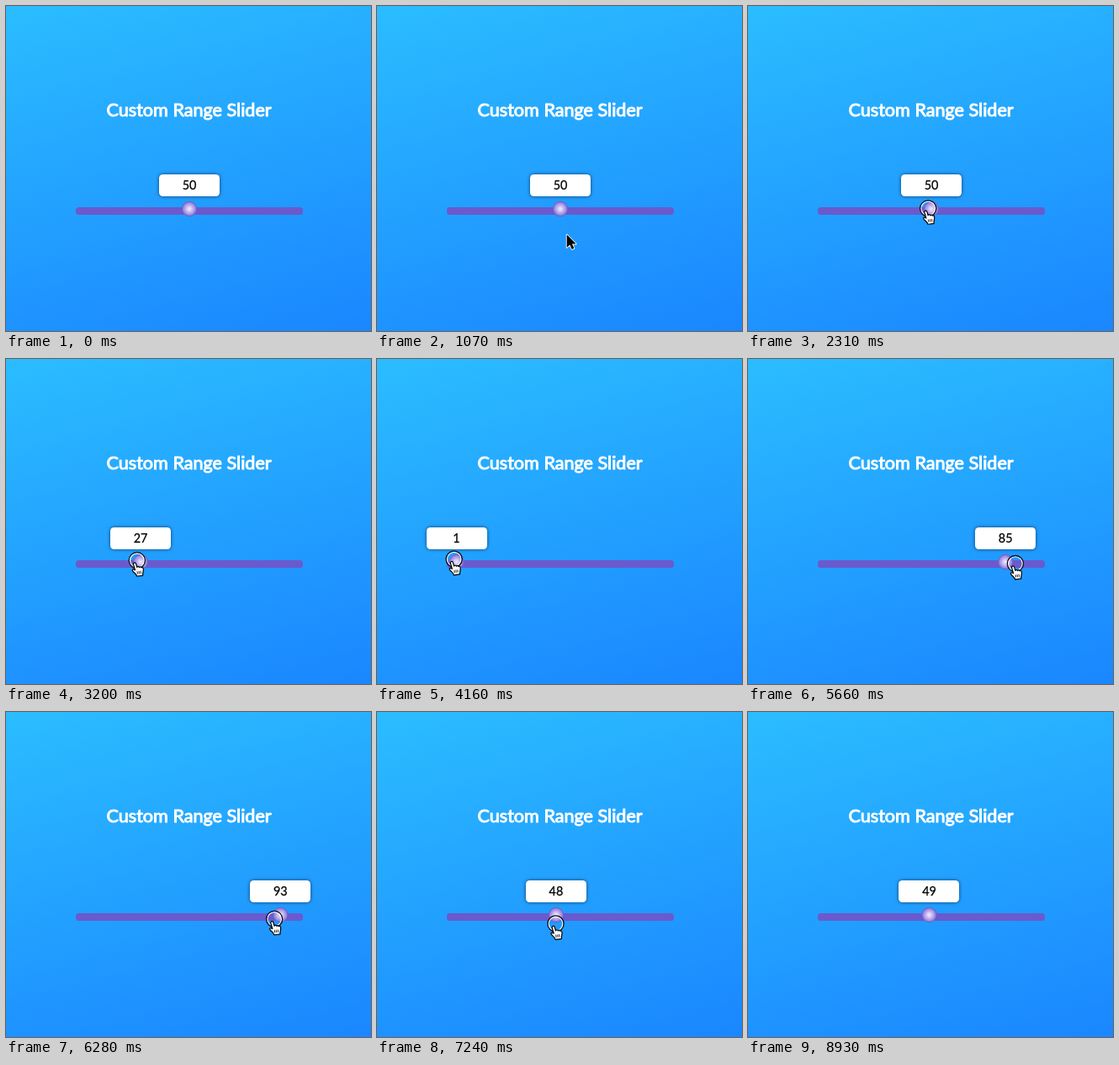
An HTML page with a canvas for the animation above (9.74 s loop, 434 by 386 pixels).

```html
<!DOCTYPE html>
<html lang="en">
<head>
<meta charset="utf-8">
<title>Custom Range Slider</title>
<style>
  html, body { margin: 0; width: 100%; height: 100%; overflow: hidden; }
  canvas { display: block; }
</style>
</head>
<body>
<canvas id="stage" width="434" height="386"></canvas>
<script>
const ctx = document.getElementById('stage').getContext('2d');
const LOOP = 9740;
const TICK = 88.2;
const LAG = 0.6;                  // the thumb trails the pointer, in ticks
const ENTER = 5, GRAB = 23, RELEASE = 94, LEAVE = 101;
const CLICK = { from: 16, to: 20 };

const ORIGIN = { x: 276, y: 392 };
const STROKES = [
  { from: 4, to: 14, x: 216.5, y: 240.5, power: 1 },
  { from: 25.6, to: 49, x: 80, y: 237.5, power: 1 },
  { from: 53, to: 66, x: 356.5, y: 244, power: 0.9 },
  { from: 68, to: 81, x: 212.5, y: 251.5, power: 0.92 },
  { from: 85, to: 89, x: 215.5, y: 251.5, power: 1 },
  { from: 97, to: 101, x: 450, y: 430, power: 1.5 }
];

const ARROW = new Path2D('M0 0V15.3L3.6 12L6 17.3L8.6 16.2L6.3 11H11Z');
const HAND = new Path2D(
  'M-3.6 4.2C-3.6 1.8 -.6 1.8 -.4 4.2L.2 8.3C.8 7 2.6 7.2 2.9 8.8' +
  'C3.6 7.7 5.1 8 5.4 9.4C6.2 8.8 7.4 9.3 7.4 10.7C7.6 13.8 5.8 15 5.8 18.7' +
  'H-1.4C-1.5 15.9 -3.9 14.6 -5.3 12.2C-6.4 10.2 -4.6 9.2 -2.5 11.2Z');
const CREASES = new Path2D('M-.2 13V16.3M1.8 13V16.3M3.8 13V16.3');

const background = ctx.createLinearGradient(155.5, -41.5, 278.5, 427.5);
background.addColorStop(0, '#2bbdff');
background.addColorStop(1, '#1a86ff');

const clamp = (n, low, high) => Math.min(high, Math.max(low, n));

function pointerAt(tick) {
  let { x, y } = ORIGIN;
  for (const s of STROKES) {
    const p = clamp((tick - s.from) / (s.to - s.from), 0, 1) ** s.power;
    x += (s.x - x) * p;
    y += (s.y - y) * p;
  }
  return { x, y };
}

function valueAt(tick) {
  const { x } = pointerAt(clamp(tick - LAG, GRAB, RELEASE));
  return clamp(Math.round((x + 0.3 - 92) / 2.52), 0, 100);
}

function box(x, y, w, h, r, color) {
  ctx.fillStyle = color;
  ctx.beginPath();
  ctx.roundRect(x, y, w, h, r);
  ctx.fill();
}

function disc(x, y, r, color) {
  ctx.fillStyle = color;
  ctx.beginPath();
  ctx.arc(x, y, r, 0, Math.PI * 2);
  ctx.fill();
}

function ring(x, y, r, color, width) {
  ctx.strokeStyle = color;
  ctx.lineWidth = width;
  ctx.beginPath();
  ctx.arc(x, y, r, 0, Math.PI * 2);
  ctx.stroke();
}

function label(text, x, y, size, color, weight) {
  ctx.font = `400 ${size}px Lato, sans-serif`;
  ctx.textAlign = 'center';
  ctx.lineJoin = 'round';
  ctx.fillStyle = ctx.strokeStyle = color;
  ctx.lineWidth = weight;
  ctx.fillText(text, x, y);
  ctx.strokeText(text, x, y);
}

function drawSlider(value) {
  const x = 92 + 2.52 * value;
  box(83, 239, 270, 9, 3.6, '#6a5acd');

  const shine = ctx.createRadialGradient(x, 241, 0, x, 241, 9);
  shine.addColorStop(0, '#f3edff');
  shine.addColorStop(0.3, '#d5caf4');
  shine.addColorStop(1, '#7c6cd6');
  disc(x, 241, 9, shine);
  ring(x, 241, 8.6, '#6a5acd', 0.8);

  ctx.save();
  ctx.shadowColor = 'rgba(0,0,0,.6)';
  ctx.shadowBlur = 4.5;
  box(Math.round(x - 36), 200, 72, 26, 4.5, '#fff');
  ctx.restore();
  label(value, x, 218, 14.4, '#000', 0.25);
}

function drawHand(x, y) {
  ctx.translate(x, y + 10);
  ctx.rotate(-0.13);
  ctx.translate(0, -10);
  ctx.fillStyle = '#fff';
  ctx.strokeStyle = '#000';
  ctx.lineWidth = 1.2;
  ctx.fill(HAND);
  ctx.stroke(HAND);
  ctx.lineWidth = 0.8;
  ctx.stroke(CREASES);
}

function drawArrow(x, y) {
  ctx.translate(x - 2.7, y + 0.8);
  ctx.strokeStyle = '#fff';
  ctx.lineWidth = 1.8;
  ctx.stroke(ARROW);
  ctx.fillStyle = '#000';
  ctx.fill(ARROW);
}

function drawPointer(tick) {
  const { x, y } = pointerAt(tick);
  const dragging = tick >= GRAB && tick < RELEASE;
  const clicking = tick >= CLICK.from && tick < CLICK.to;
  if (dragging || clicking) {
    ring(x, y, 8.4, '#fff', 1.3);
    ring(x, y, 9.6, '#0b1020', 1.3);
  }
  ctx.save();
  (dragging ? drawHand : drawArrow)(x, y);
  ctx.restore();
}

function draw(now) {
  const tick = Math.floor((now % LOOP) / TICK);
  ctx.fillStyle = background;
  ctx.fillRect(0, 0, 434, 386);
  label('Custom Range Slider', 217.6, 130.7, 21.6, '#fff', 1);
  drawSlider(valueAt(tick));
  if (tick >= ENTER && tick < LEAVE) drawPointer(tick);
  requestAnimationFrame(draw);
}

requestAnimationFrame(draw);
</script>
</body>
</html>
```
